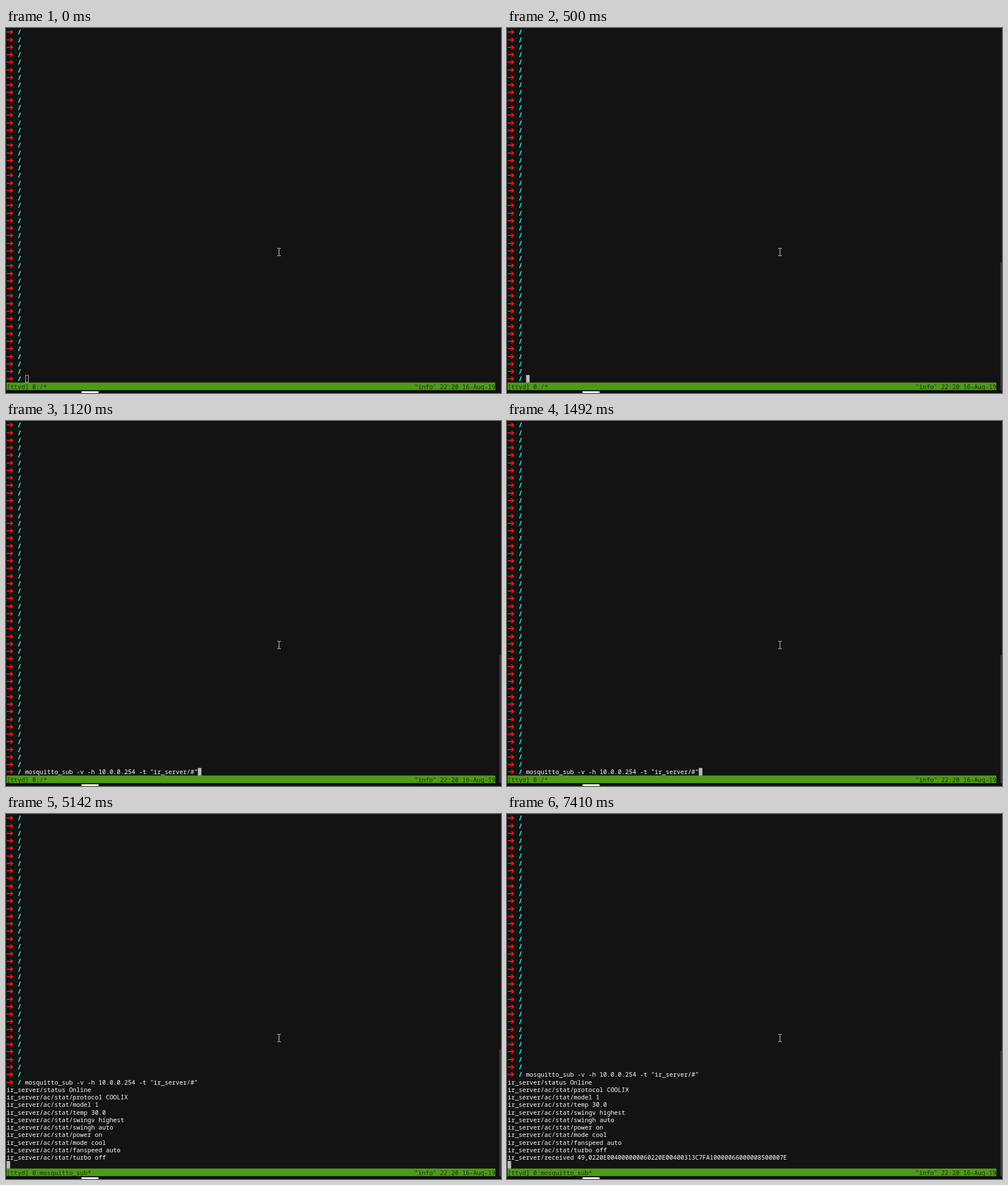
These frames come from a looping animation (872x642 px, 8000 ms). An HTML page:

```html
<!DOCTYPE html>
<html lang="en">
<head>
<meta charset="utf-8">
<title>Terminal session</title>
<style>
  :root { --row: 13.26px; --col: 6.48px; --loop: 8s step-end infinite; }
  html, body { margin: 0; width: 100%; height: 100%; overflow: hidden; background: #131313; }
  body { position: relative; font: 500 10.8px/var(--row) "Noto Sans Mono", "DejaVu Sans Mono", monospace; }
  body > *, .log, .line, .line * { position: absolute; }
  .screen { left: 1px; top: 0; width: 862px; height: 623.6px; overflow: hidden; }
  .log { left: 0; top: .4px; animation: scroll var(--loop); }
  .line { left: 0; height: var(--row); white-space: pre; color: #fff; }
  .line svg { left: 0; top: 0; fill: #f01414; }
  .slash { left: calc(3 * var(--col)); color: #34e2d8; font-weight: 700; -webkit-text-stroke: .5px; }
  .command { left: calc(5 * var(--col)); animation: typed var(--loop); }
  .received { animation: received var(--loop); }

  .blocks { left: 0; top: 0; width: 100%; height: 100%; }
  .bar { fill: #4e9a17; }
  .cursor { fill: #bbb; animation: cursor var(--loop); }
  .outline { fill: none; stroke: #bbb; animation: outline var(--loop); }
  .scrollbar { left: 869px; top: 412px; width: 3px; bottom: 5px; background: #363636;
    animation: scrollbar var(--loop); }
  .status { left: 1px; top: 623.6px; width: 861px; height: var(--row);
    color: #17300a; font-weight: 400; white-space: pre; }
  .status span { position: absolute; top: 0; }
  .clock { right: 0; }
  .shell { animation: before var(--loop); }
  .client { animation: after var(--loop); }
  .dock { left: 0; top: 639px; width: 100%; height: 3px; background: #0c0c0c; }
  .tab { left: 133px; top: 639px; width: 30px; height: 3px; background: #fff; }
  .pointer { left: 478px; top: 387px; }

  @keyframes scroll {
    0% { top: .4px; }
    21.75% { top: calc(.4px - 11 * var(--row)); }
    92.625%, 100% { top: calc(.4px - 12 * var(--row)); }
  }
  @keyframes typed { 0% { visibility: hidden; } 14%, 100% { visibility: visible; } }
  @keyframes received { 0% { visibility: hidden; } 92.625%, 100% { visibility: visible; } }
  @keyframes before { 0% { visibility: visible; } 21.75%, 100% { visibility: hidden; } }
  @keyframes after { 0% { visibility: hidden; } 21.75%, 100% { visibility: visible; } }
  @keyframes outline { 0% { visibility: visible; } 6.25%, 100% { visibility: hidden; } }
  @keyframes cursor {
    0% { x: 33.6px; visibility: hidden; }
    6.25% { x: 33.6px; visibility: visible; }
    14% { x: 337.9px; visibility: visible; }
    21.75%, 100% { x: 1px; visibility: visible; }
  }
  @keyframes scrollbar {
    0% { top: 412px; visibility: hidden; }
    6.25% { top: 412px; visibility: visible; }
    21.75% { top: 414px; visibility: visible; }
    92.625%, 100% { top: 416px; visibility: visible; }
  }
</style>
</head>
<body>
<div class="screen"><div class="log" id="log"></div></div>
<svg class="blocks">
  <rect class="bar" x="1" y="623.6" width="861" height="13.26"/>
  <rect class="cursor" x="33.6" y="610.3" width="6.3" height="13.3"/>
  <rect class="outline" x="34.5" y="611" width="5" height="12"/>
</svg>
<div class="scrollbar"></div>
<div class="status"><span class="shell">[ttyd] 0:/*</span><span class="client">[ttyd] 0:mosquitto_sub*</span><span class="clock">"info" 22:20 16-Aug-19</span></div>
<div class="dock"></div>
<div class="tab"></div>
<svg class="pointer" width="7" height="15" fill="none" stroke="#e4e4e4"><path d="M0 .5h2.5M3.5 .5h2.5M0 13.5h2.5M3.5 13.5h2.5M3 1v12"/></svg>
<script>
  const PROMPTS = 47;
  const ROW = 13.26;
  const log = document.getElementById("log");
  const stats = ["protocol COOLIX", "model 1", "temp 30.0", "swingv highest", "swingh auto",
    "power on", "mode cool", "fanspeed auto", "turbo off"];
  const output = ["status Online", ...stats.map(s => "ac/stat/" + s),
    "received 49,0220E004000000060220E00400313C7FA10000066000008500007E"];
  const prompt = '<svg width="13" height="13"><path d="M.5 6H7.5L6 3.2H7.8L12.2 7 7.8 10.8H6L7.5 8H.5Z"/></svg><span class="slash">/</span>';
  const command = '<span class="command">mosquitto_sub -v -h 10.0.0.254 -t "ir_server/#"</span>';

  function addLine(html, name = "") {
    const line = document.createElement("div");
    line.className = "line " + name;
    line.style.top = log.children.length * ROW + "px";
    line.innerHTML = html;
    log.append(line);
  }

  for (let i = 1; i <= PROMPTS; i++) addLine(i < PROMPTS ? prompt : prompt + command);
  output.forEach(text => addLine("ir_server/" + text, text.startsWith("received") ? "received" : ""));
</script>
</body>
</html>
```
